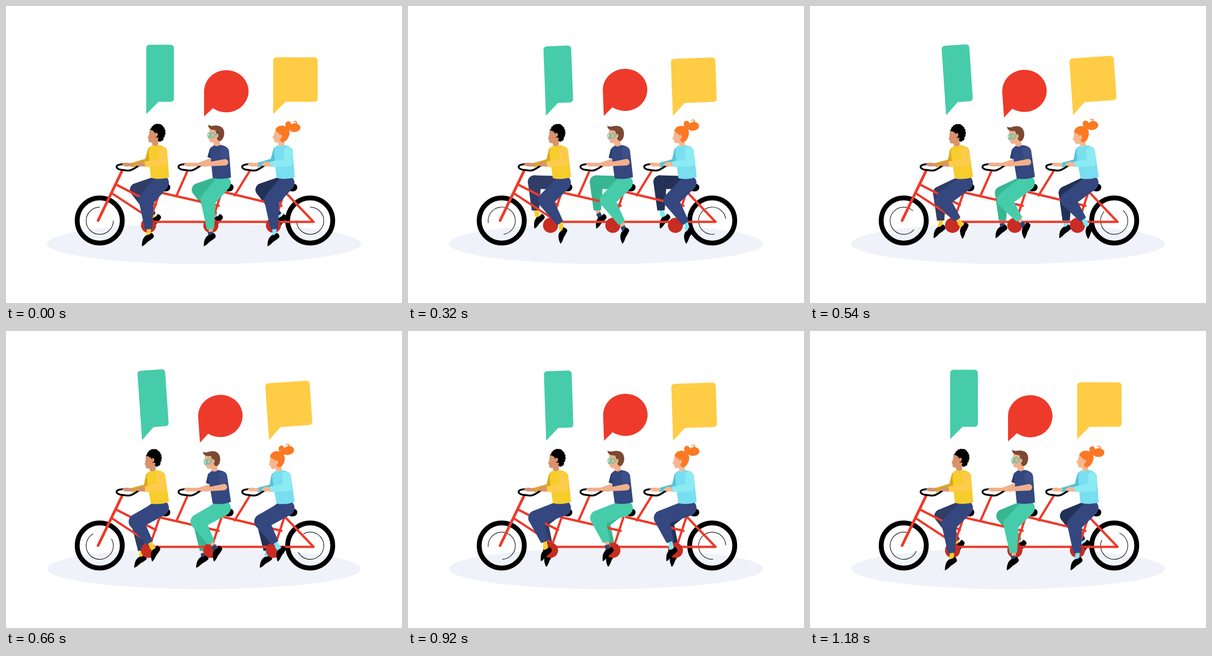
These frames come from a looping animation (864 px wide and 648 px high, 1200 ms). An HTML page with a canvas:

```html
<!DOCTYPE html>
<html lang="en">
<head>
<meta charset="utf-8">
<title>Triple tandem</title>
<style>
html, body { margin: 0; width: 100%; height: 100%; overflow: hidden; background: #fff; }
canvas { display: block; }
</style>
</head>
<body>
<canvas id="stage" width="864" height="648"></canvas>
<script>
const ctx = document.getElementById('stage').getContext('2d');
const LOOP = 1200, STEP = 20, CYCLE = 1220;
const RED = '#ee3a2a', DARK_RED = '#c92c22', GREEN = '#46ccab', YELLOW = '#ffcc45', NAVY = '#34477f';
const HIP = [336, 376], NECK = [326, 302];

// time, knee x y, cuff x y, foot x y, shoe angle
const NEAR_LEG = [
  [0, 306, 423, 311, 487, 308, 510, 141],
  [160, 300, 426, 321, 483, 324, 507, 127],
  [320, 300, 424, 332, 474, 337, 501, 116],
  [540, 289, 423, 322, 466, 336, 490, 113],
  [760, 281, 410, 306, 460, 314, 484, 131],
  [920, 279, 408, 298, 460, 300, 487, 136]
];
const FAR_LEG = [
  [0, 285, 401, 320, 457, 326, 471, 126],
  [160, 279, 388, 303, 464, 306, 480, 126],
  [320, 276, 384, 278, 446, 285, 470, 132],
  [540, 283, 408, 285, 468, 281, 492, 140],
  [760, 290, 421, 305, 484, 302, 508, 143],
  [920, 291, 417, 309, 474, 306, 497, 117]
];

const RIDERS = [
  { x: 0, head: curlyHead, nod: .05, skin: '#d8926c', shirt: '#f6cd2c', sleeve: '#ffcb4a', farSleeve: '#dba920',
    pants: NAVY, farPants: '#2f3d67', sock: '#f8cd2f' },
  { x: 135, head: glassesHead, nod: .09, skin: '#f1b08c', shirt: '#34477f', sleeve: '#3c4f87', farSleeve: '#293b70',
    pants: GREEN, farPants: '#38b692', sock: '#31437c', short: true },
  { x: 274, head: bunHead, nod: .15, skin: '#f6b690', shirt: '#79def0', sleeve: '#8cebf2', farSleeve: '#52c4d6',
    pants: NAVY, farPants: '#223157', sock: '#80e6f1' }
];

function pose(keys, t) {
  const n = keys.length;
  const key = (i, c) => keys[(i + n) % n][c] + (c ? 0 : Math.floor(i / n) * CYCLE);
  let i = n - 1;
  while (keys[i][0] > t) i--;
  const span = key(i + 1, 0) - key(i, 0), u = (t - key(i, 0)) / span;
  const slope = (k, c) => (key(k + 1, c) - key(k - 1, c)) / (key(k + 1, 0) - key(k - 1, 0)) * span;
  const v = c => {
    const a = key(i, c), b = key(i + 1, c), u2 = u * u, u3 = u2 * u;
    return a + (b - a) * (3 * u2 - 2 * u3) + slope(i, c) * (u3 - 2 * u2 + u) + slope(i + 1, c) * (u3 - u2);
  };
  return { knee: [v(1), v(2)], cuff: [v(3), v(4)], foot: [v(5), v(6)], angle: v(7) * Math.PI / 180 };
}

function fill(color, path) {
  ctx.fillStyle = color;
  ctx.fill(new Path2D(path));
}

function stroke(color, width, path, cap = 'round') {
  ctx.strokeStyle = color;
  ctx.lineWidth = width;
  ctx.lineCap = cap;
  ctx.lineJoin = 'round';
  ctx.stroke(new Path2D(path));
}

function oval(color, x, y, rx, ry = rx, turn = 0) {
  ctx.fillStyle = color;
  ctx.beginPath();
  ctx.ellipse(x, y, rx, ry, turn, 0, 7);
  ctx.fill();
}

function line(color, width, points, cap) {
  stroke(color, width, 'M' + points.map(p => p.join()).join('L'), cap);
}

function placed(x, y, turn, draw) {
  ctx.save();
  ctx.translate(x, y);
  ctx.rotate(turn);
  draw();
  ctx.restore();
}

// Tapered limb segment with a round start and a round or flat end.
function taper(color, [ax, ay], ra, [bx, by], rb, flat) {
  const a = Math.atan2(by - ay, bx - ax), q = Math.PI / 2;
  ctx.fillStyle = color;
  ctx.beginPath();
  ctx.arc(ax, ay, ra, a + q, a - q);
  if (flat) {
    ctx.lineTo(bx + rb * Math.sin(a), by - rb * Math.cos(a));
    ctx.lineTo(bx - rb * Math.sin(a), by + rb * Math.cos(a));
  } else {
    ctx.arc(bx, by, rb, a - q, a + q);
  }
  ctx.fill();
}

function leg(rider, keys, t, color, hip, hipSize, kneeSize) {
  const { knee, cuff, foot, angle } = pose(keys, t);
  const mix = k => [cuff[0] + (foot[0] - cuff[0]) * k, cuff[1] + (foot[1] - cuff[1]) * k];
  const ankle = [mix(.75)[0] + 3, mix(.75)[1]];
  line(rider.short ? rider.skin : rider.sock, 9, [mix(-.2), ankle], 'butt');
  line(rider.sock, 10, [mix(.25), ankle], 'butt');
  placed(foot[0], foot[1], angle, () =>
    fill('#000', 'M18-4C10 6 4 9-4 9L-10 6-17 6C-19-1-16-6-11-5L-4-5C4-3 10-7 18-4Z'));
  taper(color, hip, hipSize, knee, kneeSize);
  taper(color, knee, kneeSize, cuff, 8, true);
}

function wheel(x, turn) {
  ctx.strokeStyle = '#000';
  ctx.lineWidth = 10.5;
  ctx.beginPath();
  ctx.arc(x, 468, 49.2, 0, 7);
  ctx.stroke();
  ctx.lineWidth = 1.2;
  ctx.beginPath();
  ctx.arc(x, 468.5, 29.7, turn, turn + Math.PI * 1.5);
  ctx.stroke();
}

function frame() {
  const tubes = [
    [241, 390, 327, 434], [230, 408, 311, 461], [335, 407, 313, 471], [337, 407, 464, 436],
    [470, 407, 449, 471], [476, 406, 601, 436], [607, 407, 586, 471],
    [395, 362, 372, 414], [531, 361, 499, 413]
  ];
  for (const [a, b, c, d] of tubes) line(RED, 5, [[a, b], [c, d]]);
  line(RED, 5, [[311, 471], [671, 471], [610, 407]]);
  line(RED, 6, [[253, 360], [201, 468]]);
  for (const x of [311, 447, 583.5]) oval(DARK_RED, x, 478.5, 16.5);
}

function seat() {
  fill('#000', 'M331 393C340 388 350 387 355 389C361 393 359 402 352 404C345 406 342 402 331 402Z');
}

function handlebar() {
  stroke('#000', 4, 'M303 344L290 348C280 354 274 360 264 359L249 357C239 354 239 348 248 346L264 344');
}

function curlyHead(skin) {
  fill(skin, 'M318 290L319 303Q326 309 332 302L333 285Z');
  fill(skin, 'M314 268L312 280 309 288 311 290 311 295Q313 299 320 298L332 291 334 268Z');
  oval('#000', 330, 274, 13, 13);
  fill('#000', 'M329 272L346 275 342 294 334 295Z');
  for (let i = 0; i < 12; i++) {
    const a = -2.75 + i * .36;
    oval('#000', 331 + 13 * Math.cos(a), 276 + 15 * Math.sin(a) + (i > 9 ? 2 : 0), 4.2);
  }
  stroke('#000', 1, 'M335 261Q335 257 339 259');
  fill(skin, 'M315 270Q323 272 326 279L327 291 318 294Z');
  oval(skin, 328, 281, 3, 4.5, .2);
}

function glassesHead(skin) {
  fill(skin, 'M319 290L318 303Q325 309 332 303L331 286Z');
  fill(skin, 'M309 268L308 281 305 288 308 290 309 295Q312 299 319 298L329 290 330 268Z');
  fill('#7b4934', 'M306 259C314 264 318 260 326 261C338 262 342 271 341 280C340 288 336 294 331 295C325 293 325 288 325 284L322 271C314 270 306 269 306 259Z');
  oval(skin, 325, 283, 3.2, 4.5, .2);
  ctx.strokeStyle = GREEN;
  ctx.lineWidth = 1.8;
  for (const [x, rx] of [[316, 4.6], [308, 2.5]]) {
    ctx.beginPath();
    ctx.ellipse(x, 282, rx, 5.5, 0, 0, 7);
    ctx.stroke();
  }
  line(GREEN, 1.8, [[321, 282], [325, 281]]);
}

function bunHead(skin) {
  const orange = '#fb7922';
  fill(skin, 'M321 289L320 303Q327 309 333 303L333 285Z');
  fill(skin, 'M314 268L311 280 307 287 310 289 311 295Q313 299 321 298L331 290 329 267Z');
  fill(orange, 'M314 270C317 261 328 259 336 263C347 268 346 280 342 287C338 294 333 298 328 297C322 294 325 287 323 281C321 276 317 276 314 270Z');
  oval(orange, 342, 259, 6.5, 7.5);
  fill(orange, 'M337 264C343 267 346 256 356 256C366 256 371 264 367 270C362 276 350 277 343 270Z');
  stroke(orange, 1.3, 'M357 257C362 252 356 249 353 253M356 251Q362 252 359 258');
  oval(skin, 325, 285, 3, 4.5, .2);
}

function swayed([x, y], turn) {
  const dx = x - HIP[0], dy = y - HIP[1], c = Math.cos(turn), s = Math.sin(turn);
  return [HIP[0] + dx * c - dy * s, HIP[1] + dx * s + dy * c];
}

function farArm(r, turn) {
  const shoulder = swayed([317, 315], turn), elbow = swayed([309, 337], turn);
  if (r.short) {
    line(r.skin, 8, [elbow, [285, 346], [262, 346]]);
    taper(r.farSleeve, shoulder, 8, swayed([311, 332], turn), 7, true);
  } else {
    taper(r.farSleeve, shoulder, 8, elbow, 6);
    line(r.farSleeve, 10, [elbow, [274, 347.5]], 'butt');
  }
}

function hands(r) {
  fill(r.skin, 'M277 343L262 342Q253 343 253 347Q259 351 268 350L277 350Z');
}

function nearArm(r, turn) {
  const shoulder = swayed([342, 317], turn), elbow = swayed([343, 341], turn);
  fill(r.skin, 'M306 341L292 340Q284 343 283 347Q290 351 306 350Z');
  if (r.short) {
    taper(r.skin, elbow, 7, [304, 345.5], 4.2);
    taper(r.sleeve, shoulder, 9.5, swayed([344, 333], turn), 8.5, true);
  } else {
    taper(r.sleeve, shoulder, 10, elbow, 9);
    taper(r.sleeve, elbow, 9, [303, 345.5], 6, true);
  }
}

function rider(r, t, lean) {
  const turn = -.07 * lean;
  placed(HIP[0], HIP[1], turn, () => {
    ctx.translate(-HIP[0], -HIP[1]);
    placed(NECK[0], NECK[1], -r.nod * lean, () => {
      ctx.translate(-NECK[0], -NECK[1]);
      r.head(r.skin);
    });
    fill(r.shirt, 'M319 304Q326 308 332 303C345 305 352 309 352 322L356 374Q336 380 316 375L313 345 311 317Q311 307 319 304Z');
  });
  handlebar();
  hands(r);
  nearArm(r, turn);
}

function boxBubble(color, x, width, height, lean, arc) {
  const top = -27 - height, w = width;
  placed(x - 9.3 * lean, 236 + 2.2 * lean + 2.4 * arc, -.07 * lean, () => fill(color,
    `M0 0V${top + 8}Q0 ${top} 8 ${top}H${w - 8}Q${w} ${top} ${w} ${top + 8}V-35Q${w}-27 ${w - 8}-27H27Z`));
}

function bubbles(lean) {
  const arc = 4 * lean * (1 - lean);
  boxBubble(GREEN, 306, 60.5, 124.5, lean, arc);
  boxBubble(YELLOW, 583, 97, 97, lean, arc);
  placed(480.7 - 13.2 * lean, 186 - .5 * lean - 2.8 * arc, -.07 * lean, () => {
    oval(RED, 0, 0, 48.5, 46);
    fill(RED, 'M-48.5 0V55L-27 35 0 0Z');
  });
}

function eachRider(draw) {
  for (const r of RIDERS) placed(r.x, 0, 0, () => draw(r));
}

function render(t) {
  const lean = (1 - Math.cos(2 * Math.PI * t / CYCLE)) / 2;
  const spin = -4 * Math.PI * t / CYCLE;
  ctx.fillStyle = '#fff';
  ctx.fillRect(0, 0, 864, 648);
  oval('#eff2f8', 432, 518.5, 342.5, 44.5);
  bubbles(lean);
  wheel(204.5, spin);
  wheel(663.7, spin - Math.PI / 2);
  eachRider(r => {
    leg(r, FAR_LEG, t, r.farPants, [330, 386], 15, 14.5);
    farArm(r, -.07 * lean);
  });
  [0, 138, 277].forEach(x => placed(x, 0, 0, seat));
  frame();
  eachRider(r => {
    leg(r, NEAR_LEG, t, r.pants, [338, 386], 17.5, 16.5);
    rider(r, t, lean);
  });
}

function tick() {
  render(Math.floor(performance.now() % LOOP / STEP) * STEP);
  requestAnimationFrame(tick);
}
tick();
</script>
</body>
</html>
```
